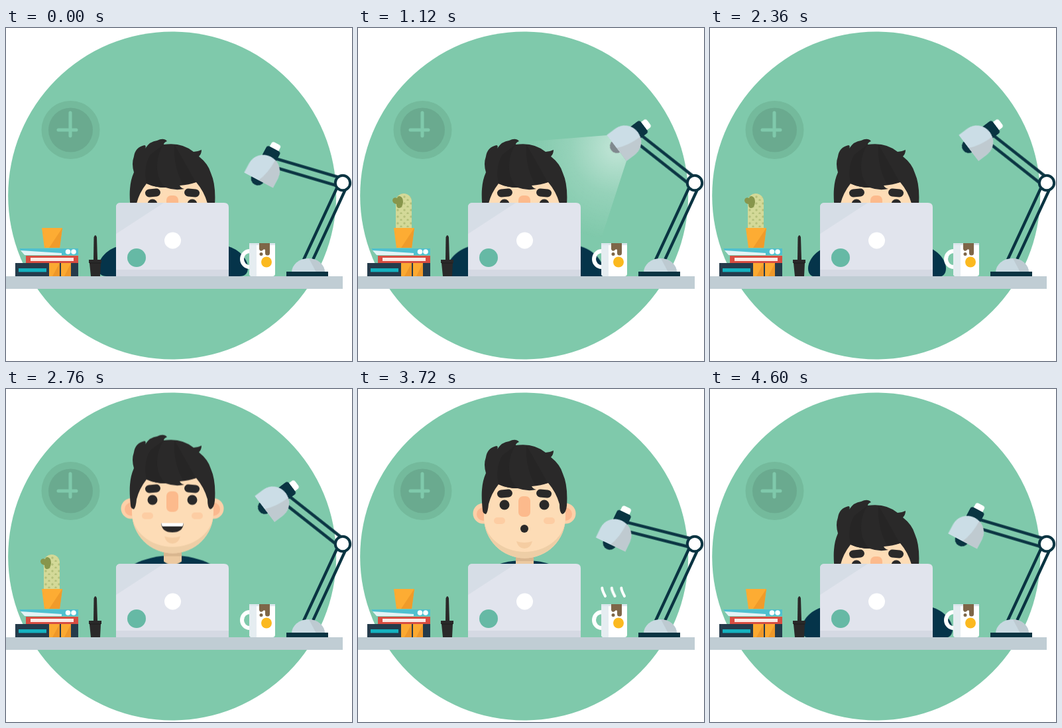
Recreate the animation shown at these times as an HTML page. Size 522 px wide and 503 px high, loop 4640 ms.

```html
<!DOCTYPE html>
<html lang="en">
<head>
<meta charset="utf-8">
<title>At the desk</title>
<style>
html, body { margin: 0; width: 100%; height: 100%; overflow: hidden; background: #fff; }
svg { display: block; width: 100%; height: 100%; }

.navy { fill: #0a3442; }
.sleeve { fill: #05344a; }
.bars { stroke: #0a3442; stroke-width: 4.3; fill: none; }
.hair { fill: #2a2929; }
.steam { fill: none; stroke: #fff; stroke-width: 4; stroke-linecap: round; }

.lamp, .shade, .cactus, .man, .arm, .beam, .bulb, .smile, .oh, .steam use {
  animation-duration: 4640ms;
  animation-iteration-count: infinite;
  animation-timing-function: ease-in-out;
}
.lamp { animation-name: lamp; }
.shade { animation-name: shade; }
.cactus { animation-name: cactus; }
.man { animation-name: man; }
.arm { animation-name: arm; }
.beam { animation-name: beam; }
.bulb { animation-name: bulb; }
.smile { animation-name: smile; }
.oh { animation-name: oh; }
.steam use { animation-name: steam; animation-timing-function: linear; }
.typing { transform-origin: 172px 330px; animation: typing 165.714ms ease-in-out infinite alternate; }

@keyframes lamp {
  0%, 2.59% { transform: rotate(16.5deg); }
  9.48% { transform: rotate(47.5deg); }
  15.09% { transform: rotate(35.5deg); }
  19.4% { transform: rotate(39.2deg); }
  23.71%, 70.69% { transform: rotate(38.3deg); }
  75% { transform: rotate(47.5deg); }
  80.17% { transform: rotate(14.2deg); }
  84.91% { transform: rotate(17.4deg); }
  88.79%, 100% { transform: rotate(16.5deg); }
}
@keyframes shade {
  0%, 2.59% { transform: rotate(11.5deg); }
  9.48% { transform: rotate(15deg); }
  15.09%, 70.69% { transform: rotate(14.6deg); }
  75% { transform: rotate(15deg); }
  80.17%, 100% { transform: rotate(11.5deg); }
}
@keyframes cactus {
  0%, 3.45% { transform: scale(.6, 0); }
  9.48% { transform: scale(1, 1.11); }
  13.79% { transform: scale(1, .97); }
  18.1%, 70.69% { transform: scale(1); }
  74.14% { transform: scale(1, 1.1); }
  78.45%, 100% { transform: scale(.6, 0); }
}
@keyframes man {
  0%, 52.59% { transform: translateY(97px); }
  61.21% { transform: translateY(-10px); }
  66.38% { transform: translateY(9px); }
  71.12%, 85.34% { transform: translateY(6px); }
  88.79% { transform: translateY(-9px); }
  94.83%, 100% { transform: translateY(97px); }
}
@keyframes arm {
  0%, 49.57% { transform: none; }
  53.45%, 93.97% { transform: translateX(40px); }
  97.41%, 100% { transform: none; }
}
@keyframes typing { to { transform: scale(1.2); } }
@keyframes beam {
  0%, 19.4% { opacity: 0; }
  20.69%, 30.17% { opacity: 1; }
  31.47%, 100% { opacity: 0; }
}
@keyframes bulb {
  0%, 19.4% { fill: #0a3442; }
  20.69%, 30.17% { fill: #80898e; }
  31.47%, 100% { fill: #0a3442; }
}
@keyframes smile {
  0%, 71.12% { transform: scale(1); }
  73.71%, 96% { transform: scale(0); }
  97.41%, 100% { transform: scale(1); }
}
@keyframes oh {
  0%, 71.12% { transform: scale(0); }
  73.71%, 96% { transform: scale(1); }
  97.41%, 100% { transform: scale(0); }
}
@keyframes steam {
  0%, 28.87% { opacity: 0; stroke-dasharray: 0 300; stroke-dashoffset: 0; }
  28.88% { opacity: 1; stroke-dasharray: 0 300; stroke-dashoffset: 0; }
  37.5% { stroke-dasharray: 80 300; stroke-dashoffset: -20; }
  38.79% { stroke-dasharray: 64 300; stroke-dashoffset: -36; }
  44.39% { opacity: 1; stroke-dasharray: 0 300; stroke-dashoffset: -100; }
  44.4%, 77.58% { opacity: 0; stroke-dasharray: 0 300; stroke-dashoffset: 0; }
  77.59% { opacity: 1; stroke-dasharray: 0 300; stroke-dashoffset: 0; }
  80.17% { stroke-dasharray: 28 300; stroke-dashoffset: 0; }
  86.21% { stroke-dasharray: 80 300; stroke-dashoffset: -20; }
  87.5% { stroke-dasharray: 64 300; stroke-dashoffset: -36; }
  93.1% { opacity: 1; stroke-dasharray: 0 300; stroke-dashoffset: -100; }
  93.11%, 100% { opacity: 0; stroke-dasharray: 0 300; stroke-dashoffset: -100; }
}
</style>
</head>
<body>
<svg viewBox="0 0 522 503">
  <defs>
    <clipPath id="aboveDesk"><path d="M0-40H522V375H0Z"/></clipPath>
    <radialGradient id="glow" gradientUnits="userSpaceOnUse" cx="391" cy="181" r="140">
      <stop offset=".1" stop-color="#fff" stop-opacity=".46"/>
      <stop offset=".5" stop-color="#fff" stop-opacity=".18"/>
      <stop offset="1" stop-color="#fff" stop-opacity="0"/>
    </radialGradient>
    <pattern id="spots" width="10" height="10" patternUnits="userSpaceOnUse" x="-12" y="-52">
      <circle cx="3" cy="4" r="1.7" fill="#b4c07a"/>
      <circle cx="8" cy="9" r="1.7" fill="#b4c07a"/>
    </pattern>
    <path id="sleeve" d="M178 328C152 331 139 350 139 362Q139 375 152 375H180Z"/>
    <path id="stem" d="M-12 2V-41A12 12 0 0 1 12-41V2Z"/>
    <path id="wisp" pathLength="100" d="M373 313C368 303 367 301 370 296C375 289 373 287 370 283C366 278 368 274 373 271"/>
  </defs>

  <circle cx="250.7" cy="253" r="247.5" fill="#7fc9ab"/>

  <!-- clock -->
  <circle cx="97.5" cy="154" r="44" fill="#74ba9c"/>
  <circle cx="97.5" cy="154" r="33.5" fill="#6aaa8f"/>
  <path d="M97 128V163M79 154H106" stroke="#7fc9ab" stroke-width="5" stroke-linecap="round"/>

  <path class="beam" d="M376 162L250 172V330H363L405 201Z" fill="url(#glow)"/>

  <!-- man -->
  <g clip-path="url(#aboveDesk)">
    <g class="sleeve">
      <g class="typing"><use class="arm" href="#sleeve"/></g>
      <g transform="translate(504) scale(-1 1)">
        <g class="typing"><use class="arm" href="#sleeve"/></g>
      </g>
    </g>
    <g class="man">
      <path class="sleeve" d="M169 298A82 45 0 0 1 333 298V400H169Z"/>
      <path d="M238 240H265V262Q251 272 238 262Z" fill="#ecc9a0"/>
      <path d="M238 244H265V254H238Z" fill="#d9b68f"/>
      <g fill="#fdd0a8">
        <circle cx="189" cy="182" r="15.5"/>
        <circle cx="313" cy="182" r="15.5"/>
      </g>
      <g fill="#fbb98f">
        <circle cx="189" cy="183" r="10"/>
        <circle cx="313" cy="183" r="10"/>
      </g>
      <path d="M190 160L205 130H295L313 160V188A61.5 61.5 0 0 1 190 188Z" fill="#fddcb6"/>
      <path d="M190 188A61.5 61.5 0 0 0 313 188A61.5 52 0 0 1 190 188" fill="#eecea6"/>
      <g fill="#fdcda3">
        <rect x="205" y="188" width="17" height="10" rx="5"/>
        <rect x="280" y="188" width="17" height="10" rx="5"/>
      </g>
      <rect x="242" y="156" width="18" height="31" rx="7" fill="#fcba8c"/>
      <path d="M239 224Q251 228 263 224Q260 235 251 235T239 224" fill="#f5cda2"/>
      <g class="hair">
        <rect x="210" y="146" width="23" height="12" rx="6" transform="rotate(-5 221 152)"/>
        <rect x="269" y="146" width="23" height="12" rx="6" transform="rotate(5 281 152)"/>
        <circle cx="221" cy="169" r="7.5"/>
        <circle cx="281" cy="169" r="7.5"/>
      </g>
      <g transform="translate(251 205)">
        <g class="smile">
          <path class="hair" d="M-17-1H17Q16 13 0 13T-17-1"/>
          <path d="M-16.8-1H16.8Q16.5 2 15 4H-15Q-16.5 2-16.8-1" fill="#fff"/>
        </g>
        <circle class="oh hair" r="6"/>
      </g>
      <path class="hair" d="M188 177Q186 158 187 146Q188 132 193 121Q189 108 193 97Q195 83 209 80Q212 81 210 85Q217 74 228 73Q238 68 243 74Q238 76 238 79Q265 75 283 90Q289 90 295 87Q295 93 291 97Q305 108 309 122Q317 140 315 170Q314 182 308 183Q304 181 304 168Q299 150 287 136Q276 140 262 141Q264 145 269 146Q255 149 241 144Q225 144 212 138Q201 152 197 168Q196 180 193 183Q188 182 188 177Z"/>
      <path d="M238 79Q227 94 228 118Q230 135 241 144Q225 144 212 138Q207 112 218 94ZM254 79Q252 111 267 139L286 136Q272 110 254 79Z" fill="#262525"/>
    </g>
  </g>

  <!-- laptop -->
  <path d="M166 375V271Q166 264 173 264H329Q336 264 336 271V375Z" fill="#e1e4ed"/>
  <path d="M166 311V271Q166 264 173 264H238Z" fill="#d6dde6"/>
  <path d="M166 365H336V375H166Z" fill="#d5d9e3"/>
  <circle cx="251.5" cy="321" r="12.5" fill="#fff"/>
  <circle cx="197" cy="347" r="14" fill="#66b9a5"/>

  <!-- books -->
  <path d="M14 355H109V375H14Z" fill="#253b4b"/>
  <path d="M19 363H61V368.500H19Z" fill="#14b2bf"/>
  <path d="M65 355H81V375H65ZM83 355H98V375H83Z" fill="#fba931"/>
  <path d="M81 355V375H70ZM98 355V375H88Z" fill="#ee9729"/>
  <path d="M30 344H109V355H30Z" fill="#d84d41"/>
  <path d="M37 347H102V352H37Z" fill="#fbeae5"/>
  <path d="M20 333H109V343H28Z" fill="#4fc0cf"/>
  <path d="M22 336L84 340V343H28Z" fill="#e4f3f5"/>
  <circle cx="93.5" cy="338" r="3.8" fill="#fff"/>
  <circle cx="102" cy="338" r="3.8" fill="#fff"/>

  <!-- cactus -->
  <g transform="translate(69 303)">
    <g class="cactus">
      <use href="#stem" fill="#d3d998"/>
      <use href="#stem" fill="url(#spots)"/>
      <path d="M-17-43A4.500 4.500 0 0 1-10-46Q-8-51-4-48Q-1-46-1-40Q-2-31-7-31Q-11-31-11-37Q-17-38-17-43" fill="#87964c"/>
    </g>
  </g>
  <path d="M54 302H85L81 332H58Z" fill="#fdac33"/>
  <path d="M85 302L81 332H65Z" fill="#f09b2a"/>

  <!-- pen pot -->
  <g class="hair">
    <path d="M132 350L132.500 316Q135 310 137 316L138 350Z"/>
    <path d="M125 350H144V355H143L142 375H128L126 355H125Z"/>
  </g>
  <path d="M126 355H143" stroke="#1d1c1c"/>

  <!-- mug -->
  <ellipse cx="367.5" cy="349" rx="11.5" ry="12" fill="none" stroke="#fff" stroke-width="6"/>
  <path d="M367 325H406V371Q406 375 402 375H371Q367 375 367 371Z" fill="#fff"/>
  <path d="M367 325H378V375H371Q367 375 367 371Z" fill="#e5edf1"/>
  <path d="M367 325H406V328H367Z" fill="#dce6ec"/>
  <path d="M382 325H398V340Q398 343.500 394.500 343.500T391 340V335Q389 333 387 336Q383 338 382 334Z" fill="#7e6648"/>
  <circle cx="385" cy="341.5" r="2.5" fill="#7e6648"/>
  <circle cx="393" cy="353.5" r="8" fill="#fbb91f"/>
  <g class="steam">
    <use href="#wisp"/>
    <use href="#wisp" x="14.5"/>
    <use href="#wisp" x="29"/>
  </g>

  <!-- lamp -->
  <path class="bars" d="M449 350L499 242M463 350L512 244"/>
  <path d="M431 369A25 21 0 0 1 481 369Z" fill="#c9d9e1"/>
  <path d="M457 348A25 21 0 0 1 481 369H468Z" fill="#bdcad1"/>
  <path class="navy" d="M423 368H486V375.500H423Z"/>
  <g transform="translate(508 234)">
    <g class="lamp">
      <path class="bars" d="M-6-6.500H-106M-6 6.500H-106"/>
      <g transform="translate(-114.6 -9)">
        <g class="shade">
          <rect x="-9" y="-20" width="15" height="16" rx="4" fill="#fff"/>
          <rect class="navy" x="-13" y="-11" width="23" height="20" rx="4"/>
          <circle class="bulb" cx="-2" cy="40" r="10.5"/>
          <path d="M-24.500 42V26A24.500 24 0 0 1 24.500 26V42Z" fill="#cbdde6"/>
          <path d="M8 3.300A24.500 24 0 0 1 24.500 26V42H0Q8 26 8 3.300" fill="#bfcad0"/>
        </g>
      </g>
    </g>
    <circle r="11.2" fill="#fff" stroke="#0a3442" stroke-width="4"/>
  </g>

  <!-- desk -->
  <path d="M0 375H508V394H0Z" fill="#c0cdd4"/>
</svg>
</body>
</html>
```
